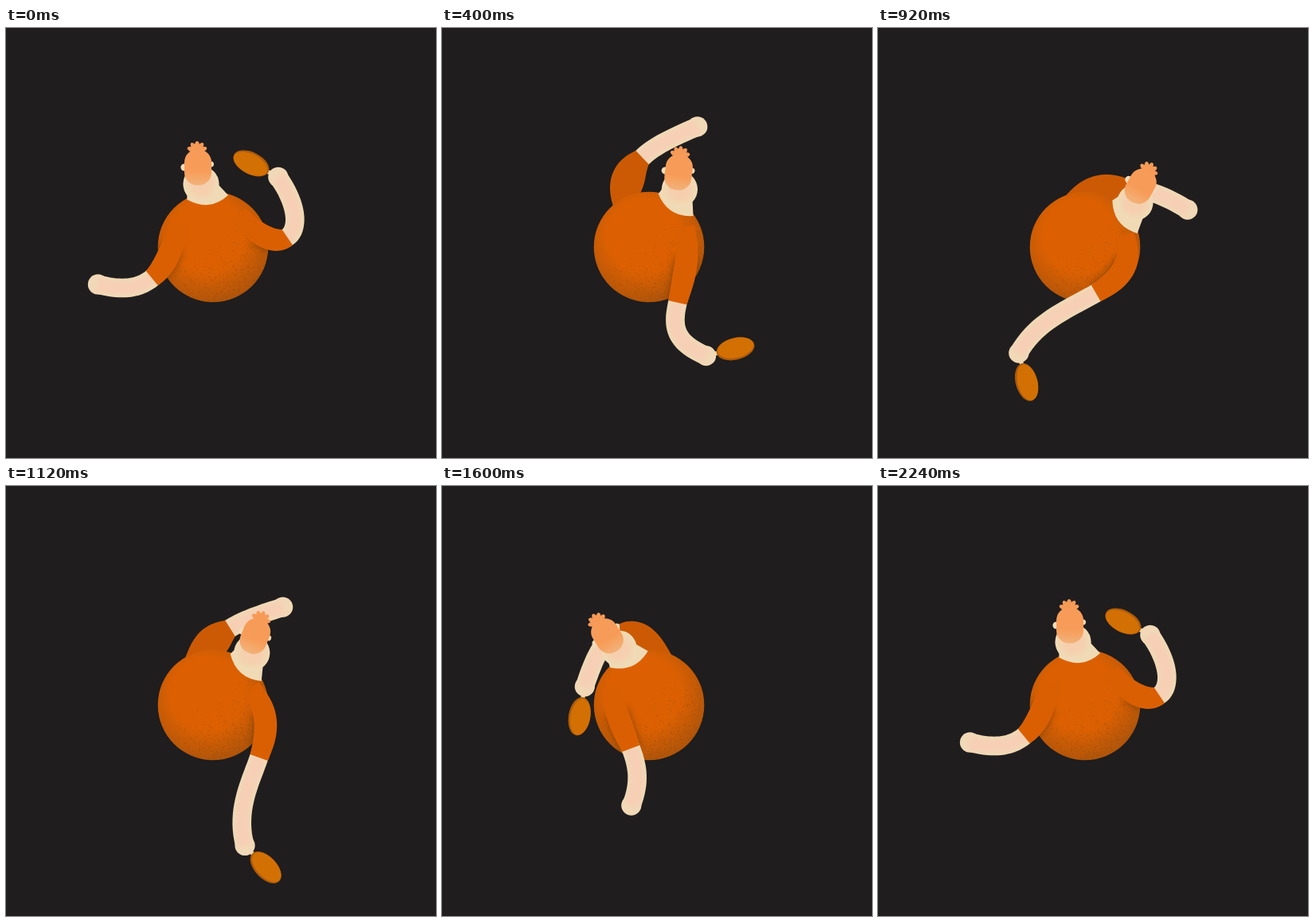
These frames come from a looping animation (540 by 540 pixels, 2.28 s). An HTML page:

```html
<!DOCTYPE html>
<html lang="en">
<head>
<meta charset="utf-8">
<title>Table tennis swing</title>
<style>
  html, body { margin: 0; width: 100%; height: 100%; overflow: hidden; background: #1f1d1e; }
  svg { display: block; width: 100vw; height: 100vh; }
</style>
</head>
<body>
<svg viewBox="0 0 540 540">
  <defs>
    <radialGradient id="shirt" cx=".45" cy=".4" r=".66">
      <stop offset=".5" stop-color="#dc6002"/>
      <stop offset="1" stop-color="#a8530c"/>
    </radialGradient>
    <linearGradient id="hair" x2="0" y2="1">
      <stop offset=".6" stop-color="#f79c58"/>
      <stop offset="1" stop-color="#f2b27a"/>
    </linearGradient>
    <radialGradient id="face">
      <stop offset=".5" stop-color="#f5cfae"/>
      <stop offset="1" stop-color="#efdcb6"/>
    </radialGradient>
    <filter id="soft" x="-30%" y="-30%" width="160%" height="160%"><feGaussianBlur stdDeviation="2"/></filter>
    <filter id="shade" x="-50%" y="-50%" width="200%" height="200%"><feGaussianBlur stdDeviation="4"/></filter>
    <clipPath id="torso"><circle cx="260" cy="275" r="69.3"/></clipPath>
  </defs>
  <rect width="540" height="540" fill="#1f1d1e"/>
  <g id="back"></g>
  <circle cx="260" cy="275" r="69.3" fill="url(#shirt)"/>
  <path id="grain" stroke="#8a4a10" stroke-opacity=".5" fill="none"/>
  <g id="front"></g>
  <g id="head"></g>
</svg>
<script>
const LOOP = 2280, STEP = 40, RADIUS = 69.3;
const torso = { x: 260, y: 275 };
const byId = id => document.getElementById(id);
const back = byId('back'), front = byId('front');

// head: jaw x, y, lean; arms: hand angle and reach around the torso,
// directions at shoulder and wrist, and the paddle angle on the right.
const pose = (head, left, right) => [...head, ...left, ...right];
const rest = pose([245, 196, 0], [-198, 152, 104, 195], [-47, 120, 50, -125, -153]);
const ready = pose([277, 195, -4], [-124, 176, 192, 278], [12, 144, 85, -55, -83]);
const wound = pose([317, 215, 25], [-23, 142, 322, 385], [109, 161, 72, 100, 55]);
const coiled = pose([323, 219, 29], [-20, 137, 322, 392], [122, 157, 72, 118, 75]);
const strike = pose([285, 200, 10], [-110, 165, 270, 270], [5, 205, 10, 0, -8]);
const follow = pose([227, 204, -12], [-228, 150, 68, 165], [-150, 125, -142, -205, -211]);
const hang = pose([222, 204, -32], [-260, 128, 85, 112], [-164, 84, -130, -252, -260]);

const keys = [
  [0, rest], [240, ready], [600, wound], [920, coiled], [1080, coiled],
  [1160, strike], [1280, follow], [1600, hang], [2240, rest]
];

// Smooth interpolation through the keys without overshoot.
function poseAt(time) {
  const last = keys.length - 1;
  if (time >= keys[last][0]) return keys[last][1];
  const rate = (i, c) => (keys[i + 1][1][c] - keys[i][1][c]) / (keys[i + 1][0] - keys[i][0]);
  const slope = (i, c) => {
    if (i === 0 || i === last) return 0;
    const a = rate(i - 1, c), b = rate(i, c);
    return a * b > 0 ? 2 * a * b / (a + b) : 0;
  };
  let i = 0;
  while (time >= keys[i + 1][0]) i++;
  const [from, a] = keys[i], [to, b] = keys[i + 1];
  const span = to - from, u = (time - from) / span, v = 1 - u;
  return a.map((value, c) =>
    v * v * (1 + 2 * u) * value + u * u * (3 - 2 * u) * b[c] +
    span * u * v * (v * slope(i, c) - u * slope(i + 1, c)));
}

function set(el, attrs) {
  for (const k in attrs) el.setAttribute(k, attrs[k]);
}
function make(parent, tag, attrs = {}) {
  const el = document.createElementNS('http://www.w3.org/2000/svg', tag);
  set(el, attrs);
  return parent.appendChild(el);
}
function polar(center, degrees, length) {
  const a = degrees * Math.PI / 180;
  return { x: center.x + Math.cos(a) * length, y: center.y + Math.sin(a) * length };
}
const xy = p => p.x.toFixed(1) + ' ' + p.y.toFixed(1);

function bezier([a, b, c, d], t) {
  const s = 1 - t;
  const at = k => s * s * s * a[k] + 3 * s * s * t * b[k] + 3 * s * t * t * c[k] + t * t * t * d[k];
  const speed = k => s * s * (b[k] - a[k]) + 2 * s * t * (c[k] - b[k]) + t * t * (d[k] - c[k]);
  return { x: at('x'), y: at('y'), turn: Math.atan2(speed('y'), speed('x')) * 180 / Math.PI };
}

function ribbon(curve, from, to, halfWidth) {
  const one = [], two = [], n = 20;
  for (let i = 0; i <= n; i++) {
    const t = from + (to - from) * i / n, p = bezier(curve, t), h = halfWidth(t);
    one.push(xy(polar(p, p.turn + 90, h)));
    two.unshift(xy(polar(p, p.turn - 90, h)));
  }
  return 'M' + one.concat(two).join('L') + 'Z';
}

function makeArm({ cuff, handle, hasPaddle }) {
  const g = make(front, 'g');
  const shadowClip = make(g, 'g', { 'clip-path': 'url(#torso)' });
  const shadow = make(shadowClip, 'path', { fill: '#6b3a0c', opacity: .75, filter: 'url(#shade)' });
  const paddle = make(g, 'g');
  if (hasPaddle) {
    make(paddle, 'path', { d: 'M8 0H18', stroke: '#efd7a8', 'stroke-width': 5 });
    make(paddle, 'ellipse', { cx: 38, rx: 24.3, ry: 13.8, fill: '#ac5a0b' });
    make(paddle, 'ellipse', { cx: 38.4, cy: -1, rx: 23, ry: 12.4, fill: '#d37004' });
  }
  const skin = make(g, 'path', { fill: '#efdab5' });
  const hand = make(g, 'circle', { r: 12.6, fill: '#f1d8b6' });
  const glow = make(g, 'path', { fill: '#f6cfb5', filter: 'url(#soft)' });
  const sleeve = make(g, 'path');

  return (shoulderAngle, [angle, reach, leave, arrive, paddleAngle = 0], inFront) => {
    const layer = inFront ? front : back;
    if (g.parentNode !== layer) layer.append(g);
    const shoulder = polar(torso, shoulderAngle, 52);
    const wrist = polar(torso, angle, reach);
    const curve = [shoulder, polar(shoulder, leave, handle), polar(wrist, arrive, -handle), wrist];
    const bulge = inFront ? 2.5 : 9;
    const sleeveWidth = t => 11.8 + bulge * Math.sin(Math.PI * t / cuff);
    shadowClip.style.display = inFront ? '' : 'none';
    set(shadow, { d: ribbon(curve, cuff * .35, cuff, sleeveWidth) });
    set(sleeve, { d: ribbon(curve, 0, cuff, sleeveWidth), fill: inFront ? '#da5f03' : '#cc5a05' });
    set(skin, { d: ribbon(curve, cuff - .03, 1, () => 11.8) });
    set(glow, { d: ribbon(curve, cuff, 1, () => 8) });
    set(hand, { cx: wrist.x, cy: wrist.y });
    set(paddle, { transform: `translate(${xy(wrist)}) rotate(${paddleAngle})` });
  };
}

function makeHead() {
  const g = byId('head');
  const collar = make(g, 'path', { fill: '#f0dab5' });
  const ears = make(g, 'g', { fill: '#f3dcba' });
  make(ears, 'circle', { cx: -21, cy: -21, r: 4.6 });
  make(ears, 'circle', { cx: 12.5, cy: -25, r: 3.5 });
  const jaw = make(g, 'circle', { r: 22.6, fill: 'url(#face)' });
  const hair = make(g, 'g', { fill: '#f69a57' });
  for (let a = -70; a <= 70; a += 35)
    make(hair, 'ellipse', { cy: -7.5, rx: 3, ry: 5.5, transform: `translate(-5 -41) rotate(${a})` });
  make(hair, 'rect', { x: -21, y: -43.5, width: 34, height: 45, rx: 16, fill: 'url(#hair)' });

  return (x, y, lean, facing) => {
    const chin = { x, y }, rim = RADIUS - 1.5;
    const hem = [polar(torso, facing - 18, rim), polar(torso, facing + 5, 44), polar(torso, facing + 27, rim)];
    const neck = [polar(chin, facing + 90, 18), polar(chin, facing - 90, 18)];
    set(collar, { d: `M${xy(hem[0])}Q${xy(hem[1])} ${xy(hem[2])}L${neck.map(xy).join('L')}Z` });
    set(jaw, { cx: x, cy: y });
    for (const part of [ears, hair])
      set(part, { transform: `translate(${xy(chin)}) rotate(${lean})` });
  };
}

// Speckles gather towards the lower right rim of the shirt.
function drawGrain() {
  let seed = 7, d = '';
  const random = () => (seed = seed * 16807 % 2147483647) / 2147483647;
  for (let i = 0; i < 3000; i++) {
    const x = random() * 2 - 1, y = random() * 2 - 1, r = Math.hypot(x, y);
    if (r < .98 && random() < (x * .6 + y + .2) * r * .8)
      d += `M${xy({ x: torso.x + x * RADIUS, y: torso.y + y * RADIUS })}h1`;
  }
  set(byId('grain'), { d });
}

const drawLeft = makeArm({ cuff: .51, handle: 65 });
const drawRight = makeArm({ cuff: .47, handle: 85, hasPaddle: true });
const drawHead = makeHead();
drawGrain();

function render(time) {
  const now = poseAt(time);
  const [x, y, lean] = now, left = now.slice(3, 7), right = now.slice(7);
  const facing = Math.atan2(y - torso.y, x - torso.x) * 180 / Math.PI;
  drawLeft(-115 + left[0] * .15, left, left[0] < -120);
  drawRight(8 + facing * .6, right, right[0] > -60);
  drawHead(x, y, lean, facing);
}

const start = performance.now();
function tick() {
  const time = (performance.now() - start) % LOOP;
  render(Math.floor(time / STEP) * STEP);
  requestAnimationFrame(tick);
}
tick();
</script>
</body>
</html>
```
